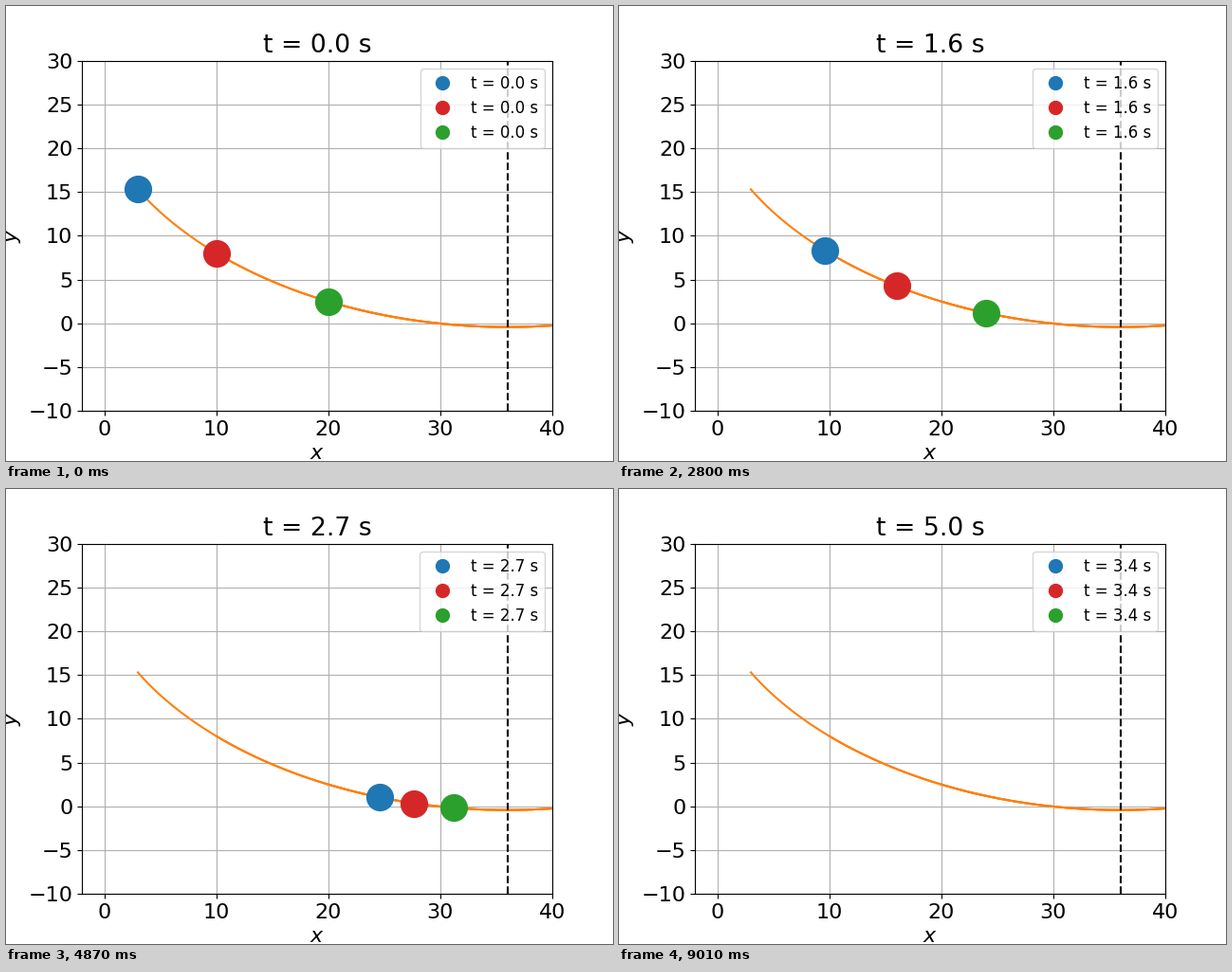
Write a matplotlib script that moves like this. It is 640 by 480 pixels and loops after 9.1 s.

```python
import numpy as np
import matplotlib.pyplot as plt
from matplotlib.animation import FuncAnimation

LOOP_MS, TICK_MS = 9100, 20
STEPS, T_END = 300, 5.0
X_LOW = 36.0                     # lowest point of the cycloid
R = X_LOW / np.pi                # radius of the rolling circle
Y_TOP = 22.5
OMEGA = np.sqrt(9.81 / (4 * R))
NUDGE = 1e-4                     # small angle that sets each ball moving
T_LOW = 3.4                      # moment the balls meet, legend clock stops
BALLS = [(3, "tab:blue"), (10, "tab:red"), (20, "tab:green")]

times = np.linspace(0, T_END, STEPS)


def cycloid(theta):
    return R * (theta - np.sin(theta)), Y_TOP - R * (1 - np.cos(theta))


def angle_at(x):
    theta = 2.0
    for _ in range(30):
        theta -= (theta - np.sin(theta) - x / R) / (1 - np.cos(theta))
    return theta


def ball_angle(start, t):
    """Tautochrone: the arc length to the lowest point is harmonic in time."""
    phase = np.sqrt(NUDGE * np.tan(start / 2))
    return 2 * np.arccos(np.cos(start / 2) * np.cos(OMEGA * t + phase))


def clock(t):
    return f"t = {t:.1f} s"


def time_at(ms):
    step = np.interp(ms, [0, 90, 1000, 7330, 7490, 9010, LOOP_MS],
                     [0, 3, 33, 244, 249, 297, STEPS])
    return times[min(int(step + 1e-6), STEPS - 1)]


plt.rcParams["font.size"] = 16
fig, ax = plt.subplots(figsize=(6.4, 4.8), dpi=100)
ax.set(xlim=(-2, 40), ylim=(-10, 30), xlabel="$x$", ylabel="$y$")
ax.set_yticks(range(-10, 31, 5))
ax.grid()
title = ax.set_title(clock(0))

starts = [angle_at(x) for x, _ in BALLS]
for start in starts:
    ax.plot(*cycloid(np.linspace(start, 1.3 * np.pi, 200)), color="tab:orange")
ax.axvline(X_LOW, color="black", linestyle="--")
balls = [ax.plot([], [], "o", color=color, markersize=20, label=clock(0))[0]
         for _, color in BALLS]
legend = ax.legend(loc="upper right", fontsize=12, markerscale=0.5)


def update(k):
    t = time_at(k * TICK_MS + TICK_MS / 2)
    title.set_text(clock(t))
    for ball, start, label in zip(balls, starts, legend.get_texts()):
        x, y = cycloid(ball_angle(start, t))
        ball.set_data([x], [y])
        label.set_text(clock(min(t, T_LOW)))
    return [title, legend, *balls]


anim = FuncAnimation(fig, update, frames=LOOP_MS // TICK_MS, interval=TICK_MS,
                     init_func=lambda: update(0), repeat=True, repeat_delay=0)
plt.show()
```
